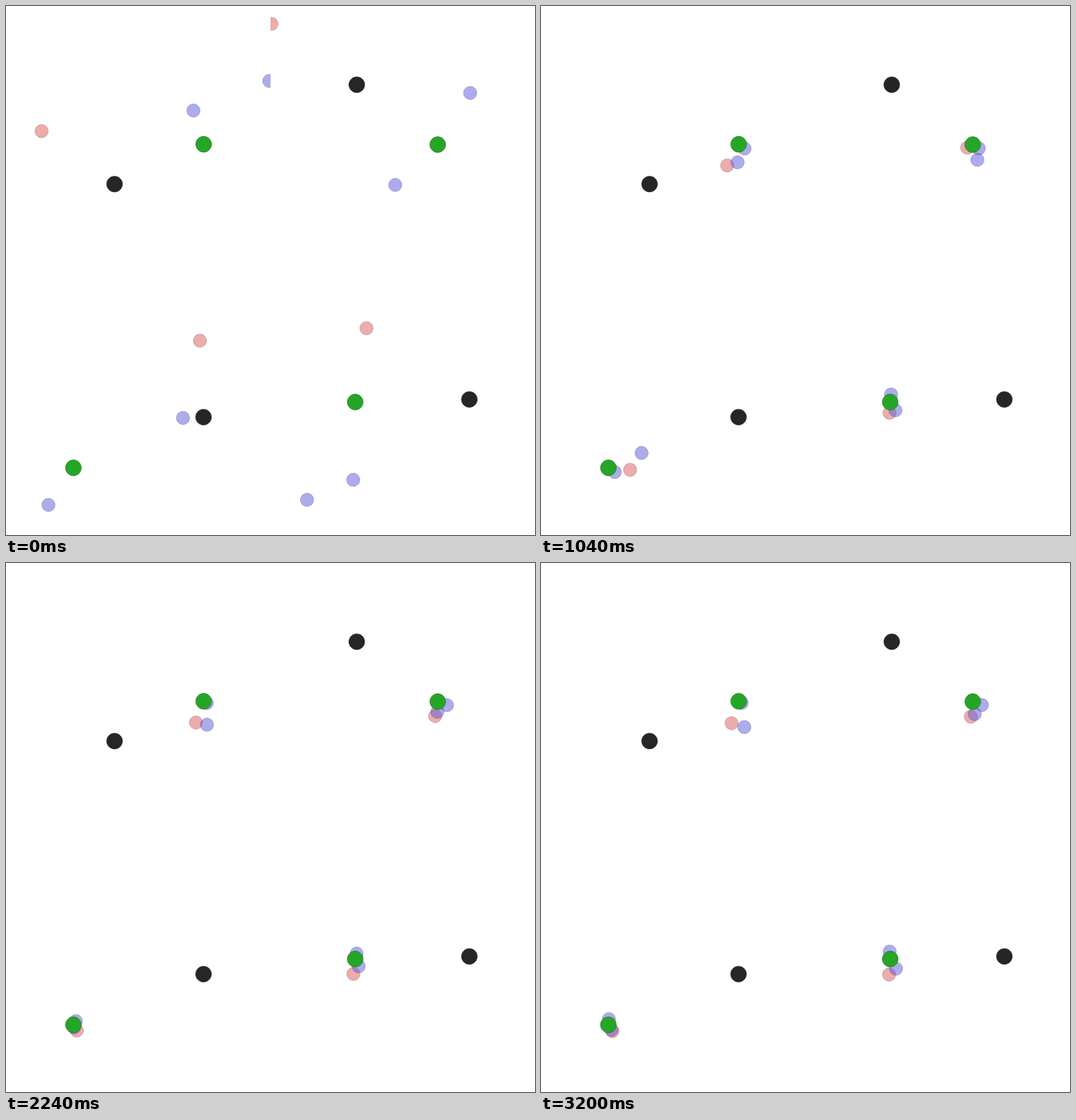
Recreate the animation shown at these times as an HTML page with a canvas. Size 748x748 px, loop 3.24 s.

```html
<!DOCTYPE html>
<html lang="en">
<head>
<meta charset="utf-8">
<title>Agents and landmarks</title>
<style>
html, body { margin: 0; width: 100%; height: 100%; overflow: hidden; background: #fff; }
canvas { display: block; width: 748px; height: 748px; }
</style>
</head>
<body>
<canvas id="stage" width="748" height="748"></canvas>
<script>
const ctx = document.getElementById('stage').getContext('2d');
const SIZE = 748, HALF = SIZE / 2;
const STEP = 40, STEPS = 81;

const RED = [217, 89, 89], BLUE = [89, 89, 217];
const GREEN = [38, 166, 38], BLACK = [38, 38, 38];
const AGENT_R = 9.35, LANDMARK_R = 11.2, SIDES = 30;

// Every agent starts, swerves, closes in and then hovers about a resting place.
const TIMES = [0, 10, 26, 44];

// Monotone cubic through the points; agents set off almost from rest.
function curve(values) {
  const sec = values.slice(1).map((v, i) => (v - values[i]) / (TIMES[i + 1] - TIMES[i]));
  const slopes = values.map((_, i) => {
    if (i === 0) return sec[0] * 0.3;
    if (i === sec.length) return 0;
    const a = sec[i - 1], b = sec[i];
    return a * b > 0 ? 2 * a * b / (a + b) : 0;
  });
  return step => {
    const last = values.length - 1;
    if (step >= TIMES[last]) return values[last];
    const i = TIMES.findIndex(t => t > step) - 1;
    const h = TIMES[i + 1] - TIMES[i], u = (step - TIMES[i]) / h, v = 1 - u;
    return values[i] * (1 + 2 * u) * v * v + values[i + 1] * u * u * (3 - 2 * u)
      + h * u * v * (slopes[i] * v - slopes[i + 1] * u);
  };
}

// sway: size in pixels, period in steps, step of one peak
function agent(color, points, sway) {
  const x = curve(points.map(p => p[0])), y = curve(points.map(p => p[1]));
  return {
    color,
    at(step) {
      const ramp = Math.min(1, Math.max(0, (step - TIMES[2]) / (TIMES[3] - TIMES[2])));
      const d = ramp * sway.size * Math.cos(2 * Math.PI * (step - sway.peak) / sway.period);
      return [x(step) + d, y(step) + d];
    }
  };
}

const CALM = { size: 1, period: 20, peak: 65 };
const LOOSE = { size: 3.5, period: 20, peak: 65 };
const QUICK = { size: 4, period: 23, peak: 56 };
const SLOW = { size: 4, period: 30, peak: 65 };

const rooms = [
  {
    x: 0, y: 0, goal: [279.5, 195.5], decoy: [153.5, 251.8],
    agents: [
      agent(RED, [[50.3, 177], [164.7, 231.5], [263.3, 225.5], [269.5, 226.5]], CALM),
      agent(BLUE, [[265, 147.8], [302, 182.3], [287.8, 201.5], [280, 194]], QUICK),
      agent(BLUE, [[372.3, 106], [328, 247.3], [278, 221], [287.5, 232]], LOOSE)
    ]
  },
  {
    x: HALF, y: 0, goal: [610.5, 196], decoy: [496, 111.3],
    agents: [
      agent(RED, [[375.3, 25.2], [507, 139], [602.7, 200.3], [607.8, 217.3]], CALM),
      agent(BLUE, [[550.4, 253], [619.7, 188.3], [619, 201.3], [619.5, 197]], QUICK),
      agent(BLUE, [[656.3, 123], [644.2, 253.2], [617, 217.5], [613.3, 213.7]], LOOSE)
    ]
  },
  {
    x: 0, y: HALF, goal: [95.3, 653], decoy: [279.3, 581.3],
    agents: [
      agent(RED, [[274.2, 473.2], [222.5, 528.5], [126, 655.8], [101, 662]], CALM),
      agent(BLUE, [[60, 705.5], [85, 640], [104.3, 659], [100, 649]], SLOW),
      agent(BLUE, [[250.3, 582.5], [223.5, 623.7], [142.2, 632], [99.5, 660]], LOOSE)
    ]
  },
  {
    x: HALF, y: HALF, goal: [493.8, 560], decoy: [655.2, 556.3],
    agents: [
      agent(RED, [[509.7, 455.7], [530.5, 504], [492.8, 575.3], [492.2, 582]], CALM),
      agent(BLUE, [[425.7, 698.2], [480, 561.5], [495, 549.3], [497, 553.5]], SLOW),
      agent(BLUE, [[491, 670], [500, 602], [501.2, 571.7], [502, 573.6]], LOOSE)
    ]
  }
];

function disc([x, y], r, color, alpha) {
  ctx.beginPath();
  for (let i = 0; i < SIDES; i++) {
    const a = 2 * Math.PI * i / SIDES;
    ctx.lineTo(x + r * Math.cos(a), y + r * Math.sin(a));
  }
  ctx.closePath();
  ctx.fillStyle = `rgba(${color},${alpha})`;
  ctx.fill();
  ctx.strokeStyle = `rgba(${color.map(c => c / 2)},${alpha / 2})`;
  ctx.stroke();
}

function draw(step) {
  ctx.fillStyle = '#fff';
  ctx.fillRect(0, 0, SIZE, SIZE);
  ctx.lineWidth = 1;
  for (const room of rooms) {
    ctx.save();
    ctx.beginPath();
    ctx.rect(room.x, room.y, HALF, HALF);
    ctx.clip();
    for (const a of room.agents) disc(a.at(step), AGENT_R, a.color, 0.5);
    disc(room.decoy, LANDMARK_R, BLACK, 1);
    disc(room.goal, LANDMARK_R, GREEN, 1);
    ctx.restore();
  }
}

const start = performance.now();
function tick() {
  const t = Math.max(0, performance.now() - start);
  draw(Math.floor(t / STEP) % STEPS);
  requestAnimationFrame(tick);
}
tick();
</script>
</body>
</html>
```
